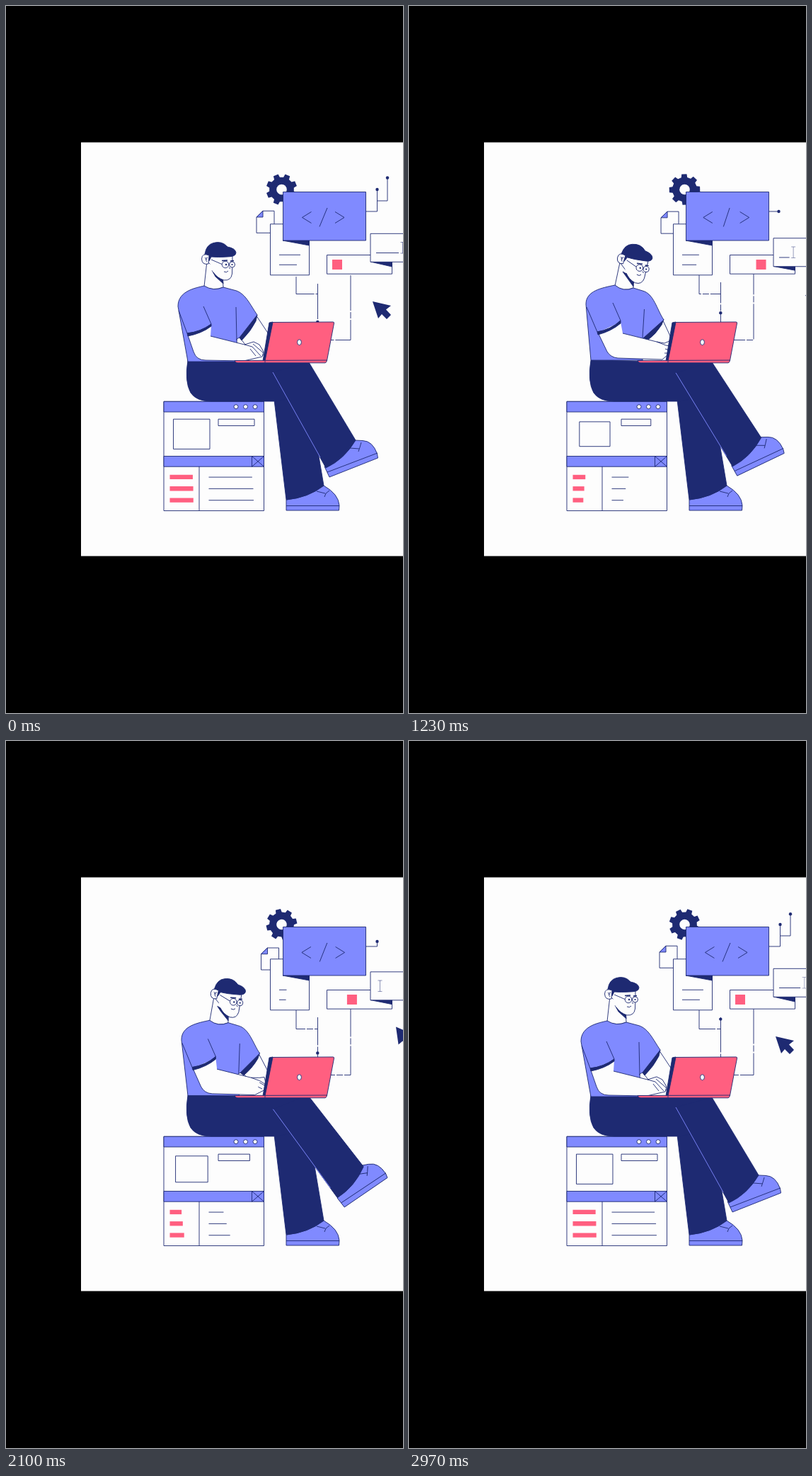
An HTML page with a canvas that plays this animation: 561 px wide and 998 px high, repeating every 3000 ms.

```html
<!DOCTYPE html>
<html lang="en">
<head>
<meta charset="utf-8">
<title>Developer at work</title>
<style>
html, body { margin: 0; width: 100%; height: 100%; overflow: hidden; background: #000; }
canvas { display: block; }
</style>
</head>
<body>
<canvas id="stage" width="561" height="998"></canvas>
<script>
const ctx = document.getElementById('stage').getContext('2d');
const NAVY = '#1e2a72', BLUE = '#808aff', PINK = '#ff5f80', WHITE = '#fdfdfd';
const LOOP = 3000, DEG = Math.PI / 180;

const wave = (t, period) => (1 - Math.cos(2 * Math.PI * t / period)) / 2;

// Interpolates through [time, value] pairs.
function track(t, keys, smooth) {
  const i = keys.findIndex(k => k[0] > t);
  if (i < 0) return keys[keys.length - 1][1];
  const [t0, a] = keys[i - 1], [t1, b] = keys[i];
  let q = (t - t0) / (t1 - t0);
  if (smooth) q = q * q * (3 - 2 * q);
  return a + (b - a) * q;
}

// Blends two path strings that share the same commands.
function morph(a, b, p) {
  const end = b.match(/[\d.]+/g);
  let i = 0;
  return a.replace(/[\d.]+/g, n => (+n + (end[i++] - n) * p).toFixed(2));
}

function shape(d, fill, stroke = NAVY, width = 0.9) {
  const path = new Path2D(d);
  if (fill) { ctx.fillStyle = fill; ctx.fill(path); }
  if (stroke) { ctx.strokeStyle = stroke; ctx.lineWidth = width; ctx.stroke(path); }
}
const line = (d, color = NAVY, width) => shape(d, null, color, width);
const box = (x, y, w, h, fill, stroke) => shape(`M${x} ${y}h${w}v${h}h${-w}Z`, fill, stroke);

function disc(x, y, rx, fill = NAVY, stroke = null, ry = rx) {
  ctx.beginPath();
  ctx.ellipse(x, y, rx, ry, 0, 0, 7);
  if (fill) { ctx.fillStyle = fill; ctx.fill(); }
  if (stroke) { ctx.strokeStyle = stroke; ctx.lineWidth = 0.9; ctx.stroke(); }
}

function turned(x, y, deg, draw, dx = 0, dy = 0) {
  ctx.save();
  ctx.translate(x + dx, y + dy);
  ctx.rotate(deg * DEG);
  ctx.translate(-x, -y);
  draw();
  ctx.restore();
}

function drawGear(t) {
  ctx.save();
  ctx.translate(389.5, 259);
  ctx.rotate((22.5 + 0.09 * t) * DEG);
  ctx.beginPath();
  for (let i = 0; i < 8; i++) {
    for (const [r, a] of [[17.5, -14], [22, -9.5], [22, 9.5], [17.5, 14]]) {
      const ang = (i * 45 + a - 90) * DEG;
      ctx.lineTo(r * Math.cos(ang), r * Math.sin(ang));
    }
  }
  ctx.closePath();
  ctx.fillStyle = NAVY;
  ctx.fill();
  disc(0, 0, 7.3, WHITE);
  ctx.restore();
}

function drawLinks(t) {
  ctx.save();
  ctx.setLineDash([50, 2, 9, 2]);
  ctx.lineDashOffset = -(2 + 63 * t / 750);
  line('M410 380V406.5H440');
  line('M440.5 390V447');
  line('M487 378V471.5H458');
  ctx.restore();
  disc(440.3, 446 - 55 * (t % 1000) / 1000, 2.2);
}

function drawNodes(t) {
  const main = track(t, [[0, 47], [650, 47], [1150, 14], [1960, 14], [2470, 47], [3000, 47]]);
  const side = track(t, [[0, 47], [190, 47], [890, 0], [2200, 0], [3000, 47]]);
  const trace = (x, y, run, len) => {
    const ex = x + Math.min(run, len), ey = y - Math.max(0, len - run);
    line(`M${x} ${y}H${ex}V${ey}`);
    disc(ex, ey, 2.2);
  };
  trace(508.5, 290, 16, main);
  if (side > 0) trace(524.5, 275, 14.5, side);
}

function drawPanels(t) {
  const u = wave(t, 1500), slow = wave(t, LOOP), spread = 6 * wave(t, 1000);

  ctx.save();
  ctx.translate(7.2 * u, 3 * u);
  shape('M363 289.3H379V320.3H354V298Z', WHITE);
  shape('M363 289.3V298H354Z', BLUE);
  ctx.restore();

  box(373.5, 307.8, 55, 72, WHITE);
  line(`M386 351.3h${30 - 21.5 * u}M386 365.3h${25 - 17 * u}`);
  shape('M391 331H428.5V338Z', NAVY);

  box(391.5, 262.5, 117, 68.5, BLUE);
  line(`M${431.5 - spread} 290.5l-13 8l13 8M${465 + spread} 290.5l13 8l-13 8`);
  line(`M${454 - spread / 3} 285L${443 + spread / 2} 311.5`);

  box(453.5, 351.5, 92, 26.7, WHITE);
  box(461 + 32 * slow, 358, 14, 14, PINK, null);
  const dy = 7 * slow;
  shape(`M515 ${361 + dy}H545.5V${368 + dy * 0.8}Z`, NAVY);
  box(515, 321.3 + dy, 60, 40, WHITE);

  const typed = track(t % 1500, [[0, 32], [308, 32], [450, 0], [1005, 0], [1500, 32]]);
  if (typed) line(`M523 ${348.5 + dy}h${typed}`);
  ctx.globalAlpha = track(t % 1000,
    [[0, 0.6], [230, 0.5], [340, 1], [500, 1], [650, 0], [930, 0], [970, 0.4], [1000, 0.6]]);
  line(`M${525.5 + typed} ${333.5 + dy}h6m-3 0v15.5m-3 0h6`);
  ctx.globalAlpha = 1;
}

function drawPointer(t) {
  const x = track(t, [[0, 518], [370, 525], [830, 572], [1230, 560], [1830, 560], [2330, 544], [2970, 518], [3000, 518]], true);
  const y = track(t, [[0, 417], [370, 414], [830, 404], [1230, 408], [1830, 408], [2330, 400], [2970, 417], [3000, 417]], true);
  const turn = track(t, [[0, 0], [370, -8], [1230, -10], [1830, -6], [2330, 23], [2970, 0], [3000, 0]], true);
  turned(0, 0, turn, () => shape('M0 0L26 6L19 11.5L26 19L20 25L13 18L8 24Z', NAVY, null), x, y);
}

function drawWindow(t) {
  const u = wave(t, LOOP);
  box(223, 558.3, 141.5, 154.2, WHITE);
  box(223, 558.3, 141.5, 14.7, BLUE);
  for (const x of [325, 338.5, 352]) disc(x, 565.7, 3, WHITE, NAVY);
  box(223, 635.5, 141.5, 14.7, BLUE);
  line('M347.5 635.5V650.2L364.5 635.5M347.5 635.5L364.5 650.2M273 650V712.5');
  box(236.5 + 4.7 * u, 583.2 + 4 * u, 51.5 - 9 * u, 42.2 - 8 * u, WHITE);
  box(300, 583.2, 51 - 10 * u, 9.3, WHITE);
  for (let i = 0; i < 3; i++) {
    const c = Math.cos(2 * Math.PI * (t - 200 + 100 * i) / LOOP), y = 661.8 + 16.3 * i;
    box(231.5, y, 23.3 + 10 * c, 6.3, PINK, null);
    line(`M286.5 ${y + 3.3}h${38 + 25.5 * c}`);
  }
}

function drawLegs(t) {
  const u = wave(t, 1500);
  shape('M396 697V712H470.5L471 705Q470 689 449 677Q427 694 396 697Z', BLUE);
  line('M396 705.5H471M439 685L451 688M457 684L452 688L450 693');
  shape('M379 556L396 697Q427 694 449 677L436 600L425 540H380Z', NAVY);
  shape('M257 500Q252 530 261 546Q269 558 290 558H382L430 548L428 503Z', NAVY);
  turned(400, 515, -7.7 * u, () => {
    turned(473, 634, -6.5 * u, () => {
      shape('M450 650L457 665L525.5 638L524.5 632Q518 614 504 613.5L493 613Q476 640 450 650Z', BLUE);
      line('M454 658L525 631M486 624L499 625M502 616L500 623L498 629');
    });
    shape('M377 517L452 652Q478 640 494 613L428 503Z', NAVY);
    line('M377 517L444 637', BLUE);
  });
}

function drawHead() {
  shape('M286 357L288 350H320L319.5 378Q318 388 308 387Q298 384 291 373Z', WHITE, null);
  line('M320 352L319.5 378Q318 388 308 387Q298 384 293 376');
  shape('M287 360Q279 358 281 350Q283 337 293 334.5Q305 331 313 340Q324 342 325 348Q325 354 313 354Q300 355 290 354Z', NAVY);
  shape('M287 352Q277 348 276.5 357Q277 366 286 364Z', WHITE);
  line('M285 355Q280 356 284 361M281 355L284 358');
  line('M290 358L305 364.5');
  disc(310, 365, 4.8, WHITE, NAVY);
  disc(319.5, 365, 4, WHITE, NAVY);
  disc(311, 365, 1.2);
  disc(319.5, 365, 1.1);
  line('M305 359.5L313 359M317 360L322 359.5', NAVY, 1.5);
  line('M314.8 364.5H315.6M315 369L317 371M308 375Q312 377 314 374');
}

function drawBody(p) {
  const part = (a, b, ...style) => shape(morph(a, b, p), ...style);

  // Far arm and its sleeve lining
  part('M329 466L353 436L371 463L366 494L338 478Z', 'M331 466L358 442L371 470L366 494L345 476Z', WHITE);
  part('M329 467L355 436L353 445Q346 459 333 472Z', 'M331 468L360 442L357 450Q349 463 337 472Z', NAVY);

  part('M284 360L280 396Q293 403 307 397L306 382Z', 'M298 362L291 395Q303 404 317 398L316 386Z', WHITE);
  part('M291 373L296 382L307 392L306 380Z', 'M302 375L307 382L317 396L318 384Z', NAVY);
  part('M280 395C268 398 243 402 243 424L257 502L328 502L326 470L330 468L355 436C345 422 338 404 322 401L307 397Q293 403 280 395Z',
       'M291 394C272 398 250 402 250 421L257 500L330 500L329 470L332 468L360 443C350 428 346 406 330 402L317 398Q303 404 291 394Z', BLUE);
  part('M325 425L326 472', 'M332.5 428L330 468', null);

  // Near arm and hand
  part('M257 465L265 488Q269 500 282 500L336 501L362 495L364 488L358 478L350 474L337 478L289 466L290 451Z',
       'M267 461L280 488Q285 496 295 497L358 499L366 492L369 484L368 473L361 476L350 474L302 462L299 446Z', WHITE, null);
  part('M257 465L265 488Q269 500 282 500L336 501L362 495L364 488L358 478L350 474L337 478L289 466',
       'M267 461L280 488Q285 496 295 497L358 499L366 492L369 484L368 473L361 476L350 474L302 462', null);
  part('M337 478L348 481L360 494M349 477L364 490M345 484L353 494', 'M350 474L363 479L368 480M362 484L368 486M361 490L366 490', null);
  part('M256 462Q275 460 290 449L290 452Q277 462 257 466Z', 'M266 460Q285 457 299 444L299 448Q286 459 267 464Z', NAVY);
  part('M279 424L290 449Q275 460 256 462L244 430', 'M288 419L299 444Q285 457 266 460L251 425', null);

  turned(281, 357, 11.5 * p, drawHead, 18 * p, -p);
}

function drawLaptop() {
  shape('M372 447L377 446L368 501H363Z', NAVY);
  shape('M377 446.5L462 446Q464 446 463.5 448L453.5 500.5L366 501Z', PINK);
  disc(414.5, 474.7, 2.9, WHITE, NAVY, 3.9);
  shape('M323 500.5L453.5 500Q453 503.5 451 503.8H327Q324 503.5 323 500.5Z', PINK);
  line('M366 501V503.5');
}

function draw(t) {
  ctx.fillStyle = '#000';
  ctx.fillRect(0, 0, 561, 998);
  ctx.fillStyle = WHITE;
  ctx.fillRect(106, 192.5, 455, 584);
  const lean = track(t, [[0, 0], [370, 1.08], [830, 1], [1230, 1], [1830, 0.97], [2330, 0.5], [2970, 0], [3000, 0]], true);
  drawGear(t);
  drawLinks(t);
  drawNodes(t);
  drawPanels(t);
  drawPointer(t);
  drawWindow(t);
  drawLegs(t);
  drawBody(lean);
  drawLaptop();
}

ctx.lineJoin = 'round';
const start = performance.now();
function tick() {
  draw((performance.now() - start) % LOOP);
  requestAnimationFrame(tick);
}
tick();
</script>
</body>
</html>
```
